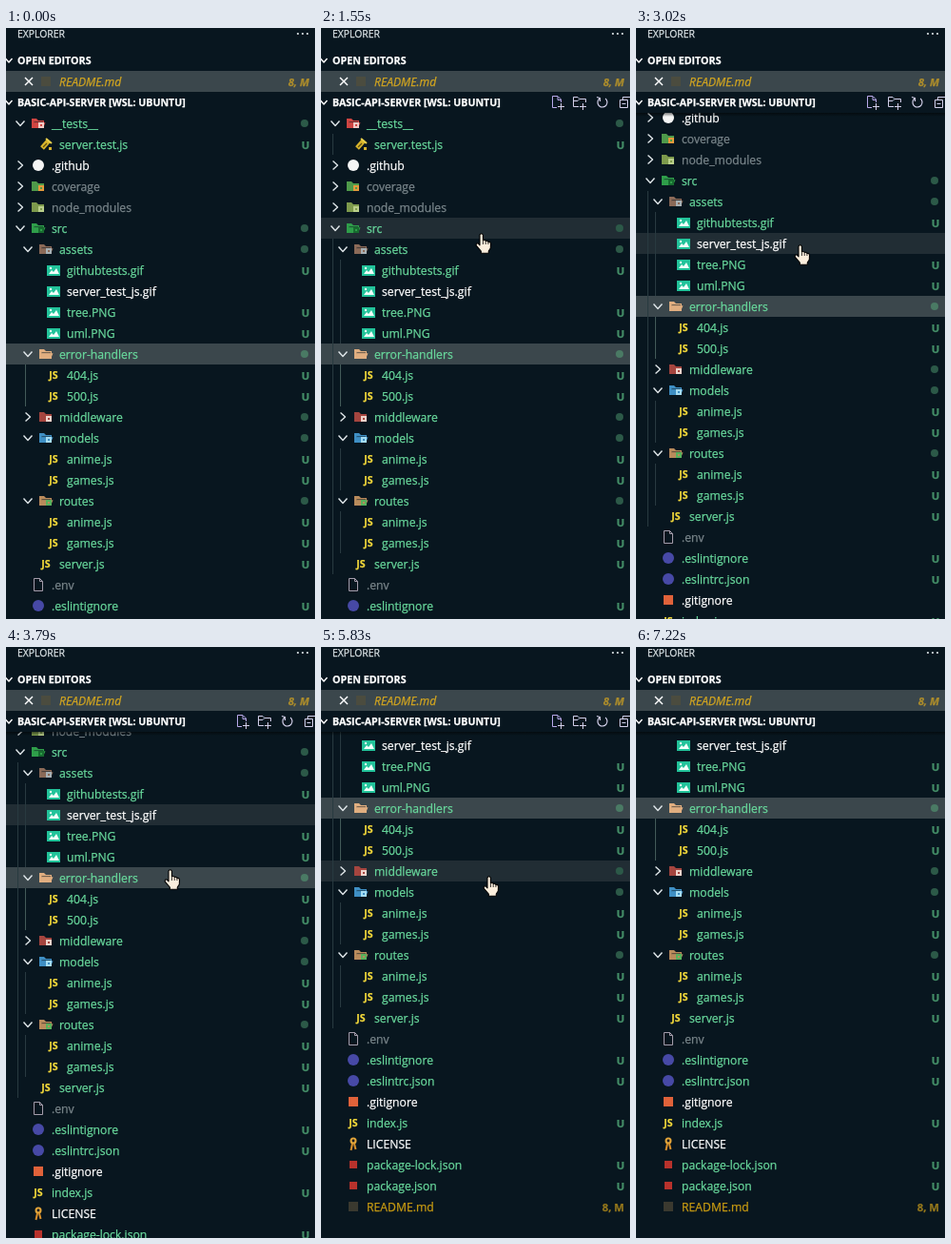
An HTML page with a canvas for the animation above (8150 ms loop, 325 px wide and 620 px high).

```html
<!DOCTYPE html>
<html lang="en">
<head>
<meta charset="utf-8">
<title>File explorer</title>
<style>
  html, body { margin: 0; width: 100%; height: 100%; overflow: hidden; background: #08161f; }
  canvas { display: block; width: 325px; height: 620px; }
</style>
</head>
<body>
<canvas id="stage"></canvas>
<script>
const W = 325, H = 620, LOOP = 8150, ROW = 22, TOP = 89;
const canvas = document.getElementById('stage');
const dpr = window.devicePixelRatio || 1;
canvas.width = W * dpr;
canvas.height = H * dpr;
const c = canvas.getContext('2d');
c.scale(dpr, dpr);

const FONT = '"Open Sans", "Noto Sans", sans-serif';
const BG = '#08161f', GREEN = '#68d89c', WHITE = '#ffffff', GREY = '#7a868b', GOLD = '#c79a12';
const SELECTED = 11;

// name, depth, icon, status, folder state (o = open, c = closed)
const rows = [
  ['__tests__', 0, 'tests', 'U', 'o'],
  ['server.test.js', 1, 'vial', 'U'],
  ['.github', 0, 'disc', '', 'c'],
  ['coverage', 0, 'coverage', 'I', 'c'],
  ['node_modules', 0, 'modules', 'I', 'c'],
  ['src', 0, 'src', 'U', 'o'],
  ['assets', 1, 'assets', 'U', 'o'],
  ['githubtests.gif', 2, 'image', 'U'],
  ['server_test_js.gif', 2, 'image', ''],
  ['tree.PNG', 2, 'image', 'U'],
  ['uml.PNG', 2, 'image', 'U'],
  ['error-handlers', 1, 'plain', 'U', 'o'],
  ['404.js', 2, 'js', 'U'],
  ['500.js', 2, 'js', 'U'],
  ['middleware', 1, 'middle', 'U', 'c'],
  ['models', 1, 'models', 'U', 'o'],
  ['anime.js', 2, 'js', 'U'],
  ['games.js', 2, 'js', 'U'],
  ['routes', 1, 'routes', 'U', 'o'],
  ['anime.js', 2, 'js', 'U'],
  ['games.js', 2, 'js', 'U'],
  ['server.js', 1, 'js', 'U'],
  ['.env', 0, 'page', 'I'],
  ['.eslintignore', 0, 'lint', 'U'],
  ['.eslintrc.json', 0, 'lint', 'U'],
  ['.gitignore', 0, 'git', ''],
  ['index.js', 0, 'js', 'U'],
  ['LICENSE', 0, 'license', ''],
  ['package-lock.json', 0, 'pkg', 'U'],
  ['package.json', 0, 'pkg', 'U'],
  ['README.md', 0, 'doc', 'M']
];

// folder colour, badge colour
const folders = {
  tests: ['#cf4542', '#f3c9c4'],
  coverage: ['#4f9a4a', '#e39a3c'],
  modules: ['#7d9a4c', '#b9cf8a'],
  src: ['#2f9e4a', '#176b2f'],
  assets: ['#8b6a58', '#a7b0b4'],
  plain: ['#e0ae80'],
  middle: ['#a5453f', '#efd3cb'],
  models: ['#3f8fc4', '#a5dcf2'],
  routes: ['#b98b5c', '#58b05c']
};

// pointer moves: start, end, number of steps, x, y
const moves = [
  [140, 440, 5, 131, 315], [610, 680, 2, 134, 289], [760, 990, 4, 153, 205],
  [1370, 1550, 3, 162, 215], [1700, 1950, 4, 163, 224], [2180, 2255, 2, 165, 226],
  [3020, 3020, 1, 166, 227], [3400, 3560, 3, 166, 233], [4280, 4280, 1, 166, 234],
  [4500, 4500, 1, 166, 235], [5050, 5200, 3, 166, 235], [5430, 5430, 1, 167, 236],
  [5600, 5830, 4, 170, 240], [5910, 6370, 7, 180, 388], [6520, 6520, 1, 182, 396],
  [6600, 6830, 4, 190, 493], [6980, 7220, 4, 196, 640]
];
const scrolls = [[0, 0], [2330, 50], [3790, 100], [4670, 150], [5600, 173]];
// the hover highlight follows a scroll only at the next pointer update
const hoverScrolls = [[0, 0], [3020, 50], [4110, 100], [5050, 150], [5670, 173]];

const valueAt = (list, t) => list.filter(k => k[0] <= t).pop()[1];

function pointerAt(t) {
  let x = 105, y = 670;
  for (const [a, b, n, mx, my] of moves) {
    if (t < a) break;
    const k = a === b ? 1 : Math.min(n, Math.floor((t - a) / (b - a) * (n - 1) + 1e-6) + 1) / n;
    x += (mx - x) * k;
    y += (my - y) * k;
  }
  return [Math.round(x), Math.round(y)];
}

function box(x, y, w, h, color) {
  c.fillStyle = color;
  c.fillRect(x, y, w, h);
}

function disc(x, y, r, color) {
  c.fillStyle = color;
  c.beginPath();
  c.arc(x, y, r, 0, Math.PI * 2);
  c.fill();
}

function poly(points, color) {
  c.fillStyle = color;
  c.beginPath();
  points.forEach(([x, y]) => c.lineTo(x, y));
  c.closePath();
  c.fill();
}

function line(points, color, width = 1) {
  c.strokeStyle = color;
  c.lineWidth = width;
  c.beginPath();
  points.forEach(([x, y], i) => i ? c.lineTo(x, y) : c.moveTo(x, y));
  c.stroke();
}

// a hairline outline gives the slightly heavy look of screen-hinted type
function text(s, x, y, color, style = '12.2px', align = 'left') {
  c.font = style + ' ' + FONT;
  c.textAlign = align;
  c.textBaseline = 'alphabetic';
  c.fillStyle = c.strokeStyle = color;
  c.lineWidth = 0.25;
  c.lineJoin = 'round';
  c.fillText(s, x, y);
  c.strokeText(s, x, y);
}

function chevron(x, y, open, color = '#dfe6e9', r = 4.5) {
  const h = r * 0.55;
  line(open ? [[x - r, y - h], [x, y + h], [x + r, y - h]]
            : [[x - h, y - r], [x + h, y], [x - h, y + r]], color, 1.4);
}

function folder(x, y, [main, badge], open) {
  poly([[x - 7, y - 5], [x - 2, y - 5], [x, y - 3], [x + 6, y - 3], [x + 6, y + 5], [x - 7, y + 5]], main);
  if (open) {
    poly([[x - 4.5, y - 1.5], [x - 4.5, y - 0.7], [x + 5, y - 0.7], [x + 5, y - 1.5]], BG);
    poly([[x - 4.5, y - 0.7], [x + 7.5, y - 0.7], [x + 5, y + 5], [x - 7, y + 5]], main);
  }
  if (badge) {
    box(x, y - 1, 6, 6, badge);
    box(x + 2, y + 1, 2, 2, main);
  }
}

const icons = {
  js: (x, y) => text('JS', x, y + 4, '#f2d83b', '700 10.6px', 'center'),
  disc: (x, y) => disc(x, y, 6, '#f5f5f5'),
  lint: (x, y) => disc(x, y, 6, '#4749a6'),
  git: (x, y) => box(x - 5, y - 5, 10, 10, '#e0623a'),
  pkg: (x, y) => box(x - 4, y - 4, 8, 8, '#b8322c'),
  doc: (x, y) => box(x - 5, y - 5, 10, 10, '#3a392f'),
  image(x, y) {
    box(x - 7, y - 5, 14, 11, '#22c39a');
    poly([[x - 5, y + 4], [x - 2, y], [x, y + 2], [x + 3, y - 2], [x + 6, y + 4]], '#f2fffa');
    disc(x - 3, y - 2, 1.2, '#f2fffa');
  },
  vial(x, y) {
    line([[x + 3, y - 4], [x - 4, y + 4]], '#d9b52c', 5);
    line([[x, y - 6], [x + 6, y - 1]], '#e8cf4c', 2);
    line([[x + 1, y - 1], [x - 3, y + 3]], '#5c4d12', 1.2);
    box(x + 3, y + 3, 3, 3, '#d9b52c');
  },
  page(x, y) {
    line([[x - 4.5, y - 6.5], [x + 1.5, y - 6.5], [x + 4.5, y - 3.5], [x + 4.5, y + 6.5],
      [x - 4.5, y + 6.5], [x - 4.5, y - 6.5]], '#a49cab');
    line([[x + 1.5, y - 6.5], [x + 1.5, y - 3.5], [x + 4.5, y - 3.5]], '#a49cab');
  },
  license(x, y) {
    disc(x, y - 3, 3.5, '#e3a53a');
    disc(x, y - 3, 1.4, BG);
    line([[x - 1, y], [x - 2.5, y + 7]], '#d8902c', 2);
    line([[x + 1, y], [x + 2.5, y + 6]], '#d8902c', 2);
  }
};

function guide(x, first, last, scroll, color) {
  box(x, TOP + first * ROW - scroll, 1, (last - first + 1) * ROW, color);
}

function drawRow(i, y, hover) {
  const [name, depth, icon, status, state] = rows[i];
  const dx = depth * 8;
  const color = { U: GREEN, I: GREY, M: GOLD, '': WHITE }[status];
  if (i === SELECTED) box(0, y - 11, W, ROW, '#3b474c');
  else if (hover) box(0, y - 11, W, ROW, '#212d34');

  if (state) chevron(15 + dx, y, state === 'o');
  if (folders[icon]) folder(34 + dx, y, folders[icon], state === 'o');
  else icons[icon](34 + dx, y);
  text(name, 48 + dx, y + 4.5, color);

  if (state && status === 'U') disc(314, y, 4, i === SELECTED ? '#4a7a64' : '#2c5948');
  else if (status === 'U') text('U', 315, y + 4.5, '#459069', '700 11.3px', 'center');
  else if (status === 'M') text('8, M', 319, y + 4.5, '#94771c', '700 11.3px', 'right');
}

function drawList(scroll, hover, active) {
  c.save();
  c.beginPath();
  c.rect(0, TOP, W, H - TOP);
  c.clip();
  rows.forEach((r, i) => {
    const y = TOP + 11 + i * ROW - scroll;
    if (y > TOP - 11 && y < H + 11) drawRow(i, y, i === hover);
  });
  if (active) {
    const faint = '#283a40';
    guide(12, 1, 1, scroll, faint);
    guide(12, 6, 21, scroll, faint);
    guide(20, 7, 10, scroll, faint);
    guide(20, 16, 17, scroll, faint);
    guide(20, 19, 20, scroll, faint);
  }
  guide(20, 12, 13, scroll, '#435a58');
  if (scroll) {
    const g = c.createLinearGradient(0, TOP, 0, TOP + 4);
    g.addColorStop(0, 'rgba(0,0,0,.5)');
    g.addColorStop(1, 'rgba(0,0,0,0)');
    box(0, TOP, W, 4, g);
  }
  c.restore();
}

function drawActions() {
  const ink = '#d3d0ea', y = 78;
  c.save();
  c.translate(-1, 0);
  // new file
  line([[249, y + 5.5], [244.5, y + 5.5], [244.5, y - 6.5], [250, y - 6.5], [253.5, y - 3], [253.5, y]], '#b9a9ea');
  line([[250, y - 6], [250, y - 2.5], [253, y - 2.5]], '#b9a9ea');
  line([[250, y + 4.5], [257, y + 4.5]], ink);
  line([[253.5, y + 1], [253.5, y + 8]], ink);
  // new folder
  line([[272, y + 4.5], [266.5, y + 4.5], [266.5, y - 5.5], [271, y - 5.5], [273, y - 3.5], [279.5, y - 3.5], [279.5, y]], ink);
  line([[267, y - 1.5], [271, y - 1.5], [273, y - 3.5]], ink);
  line([[273, y + 4.5], [280, y + 4.5]], ink);
  line([[276.5, y + 1], [276.5, y + 8]], ink);
  // refresh
  c.strokeStyle = ink;
  c.lineWidth = 1.2;
  c.beginPath();
  c.arc(297, y, 5, -0.9, 4.1);
  c.stroke();
  line([[291, y - 5.5], [294.5, y - 4.5], [294.5, y - 1]], ink, 1.2);
  // collapse all
  c.strokeStyle = ink;
  c.lineWidth = 1;
  c.strokeRect(315.5, y - 2.5, 8, 8);
  line([[318.5, y - 3], [318.5, y - 5.5], [326, y - 5.5]], ink);
  line([[317.5, y + 1.5], [321.5, y + 1.5]], ink);
  c.restore();
}

function drawHeader(active) {
  text('EXPLORER', 12, 10, '#dde4e7', '10.4px');
  [307, 312, 317].forEach(x => disc(x, 6, 1.1, '#dde4e7'));

  chevron(3, 34, true, WHITE, 3.5);
  text('OPEN EDITORS', 12, 38, WHITE, '700 10.7px');

  box(0, 45, W, ROW, '#3b474c');
  line([[20, 52], [28, 60]], WHITE, 1.4);
  line([[28, 52], [20, 60]], WHITE, 1.4);
  box(37, 51, 10, 10, '#4b4c3f');
  text('README.md', 56, 60.5, '#d2a520', 'italic 12.2px');
  text('8, M', 319, 60.5, '#ad8d2c', 'italic 700 11.3px', 'right');

  chevron(3, 78, true, WHITE, 3.5);
  text('BASIC-API-SERVER [WSL: UBUNTU]', 12, 82, WHITE, '700 10.6px');
  if (active) drawActions();
}

function drawPointer(x, y) {
  c.save();
  c.translate(x, y);
  c.beginPath();
  c.moveTo(5, 2);
  c.quadraticCurveTo(6.7, -0.4, 8.4, 2);
  c.lineTo(8.4, 8);
  c.quadraticCurveTo(10, 6.8, 11.4, 8.4);
  c.quadraticCurveTo(13, 7.8, 14, 9.4);
  c.quadraticCurveTo(16.5, 9, 16.5, 11.5);
  c.lineTo(16.3, 16);
  c.lineTo(14.3, 19);
  c.lineTo(14.3, 21.3);
  c.lineTo(6.3, 21.3);
  c.lineTo(6.3, 19);
  c.lineTo(1.2, 13.2);
  c.quadraticCurveTo(1, 10, 3.5, 11.2);
  c.lineTo(5, 12.8);
  c.closePath();
  c.fillStyle = '#fbeedd';
  c.fill();
  c.strokeStyle = '#000';
  c.lineWidth = 1.1;
  c.stroke();
  [8.4, 11.2, 13.9].forEach((px, i) => line([[px, 8.5 + i * 0.4], [px, 12]], '#000', 0.8));
  c.restore();
}

function draw(t) {
  const active = t >= 140 && t < 7220;
  const [x, y] = pointerAt(t);
  const hover = active ? Math.floor((y - TOP + valueAt(hoverScrolls, t)) / ROW) : -1;
  box(0, 0, W, H, BG);
  drawList(valueAt(scrolls, t), hover, active);
  drawHeader(active);
  if (active) drawPointer(x, y);
}

const start = performance.now();
function tick() {
  draw((performance.now() - start) % LOOP);
  requestAnimationFrame(tick);
}
tick();
</script>
</body>
</html>
```
